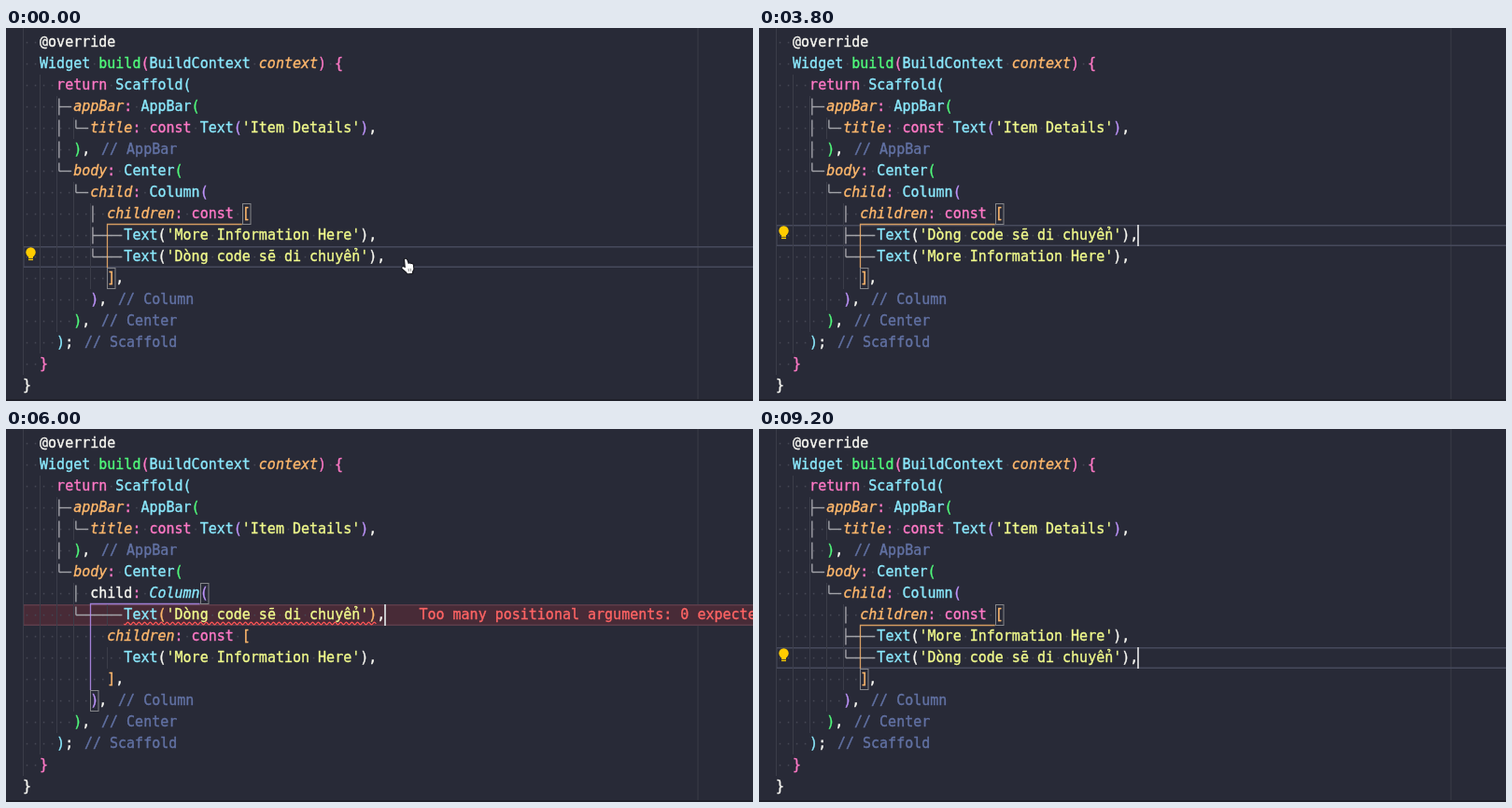
Recreate the animation shown at these times as an HTML page with a canvas. Size 800x400 px, loop 9400 ms.

```html
<!DOCTYPE html>
<html lang="en">
<head>
<meta charset="utf-8">
<title>Moving a line of code</title>
<style>
html, body { margin: 0; width: 100%; height: 100%; overflow: hidden; background: #282a37; }
canvas { display: block; width: 800px; height: 400px; }
</style>
</head>
<body>
<canvas id="stage" width="800" height="400"></canvas>
<script>
const ctx = document.getElementById('stage').getContext('2d');
const LOOP = 9400, LINE = 23, CHAR = 9.03;
const FONT = '15px "DejaVu Sans Mono", monospace';
const BACK = '#282a37', TREE = '#a2a3a9';
const WHITE = '#f8f8f2', PINK = '#ff79c6', CYAN = '#8be9fd', GREEN = '#50fa7b';
const PURPLE = '#bd93f9', ORANGE = '#ffb86c', YELLOW = '#f1fa8c', COMMENT = '#6272a4', RED = '#ff6464';
const BRACKETS = [WHITE, PINK, CYAN, GREEN, PURPLE, ORANGE];

const MORE = "            Text('More Information Here'),";
const MOVING = "            Text('Dòng code sẽ di chuyển'),";
const CODE = [
  '  @override',
  '  Widget build(BuildContext context) {',
  '    return Scaffold(',
  '      appBar: AppBar(',
  "        title: const Text('Item Details'),",
  '      ), // AppBar',
  '      body: Center(',
  '        child: Column(',
  '          children: const [',
  MORE,
  '          ],',
  '        ), // Column',
  '      ), // Center',
  '    ); // Scaffold',
  '  }',
  '}'
];

// Tree guides: [row, column, kind, end column]
const tee = (row, col, end) => [row, col, 'T', end];
const corner = (row, col, end) => [row, col, 'L', end];
const bar = (row, col) => [row, col, 'I'];
const OUTER = [tee(3, 4, 6), bar(4, 4), corner(4, 6, 8), bar(5, 4), corner(6, 4, 6)];
const LIST = [corner(7, 6, 8), bar(8, 8), tee(9, 8, 12), corner(10, 8, 12)];
const SWAPPED = [corner(7, 6, 8), bar(8, 8), tee(9, 0, 4), corner(9, 8, 12)];
const IN_COLUMN = [corner(7, 6, 8), tee(8, 8, 12), bar(9, 8), corner(10, 8, 12)];
const IN_CENTER = [tee(7, 6, 12), corner(8, 6, 8), bar(9, 8), corner(10, 8, 12)];
const LEAVING_CENTER = [bar(7, 6), corner(8, 6, 12)];

// Row of the moving line plus the editor decorations, from each time on
const STEPS = [
  { at: 0, row: 10, tree: LIST, bulb: 10 },
  { at: 1400, row: 9, tree: SWAPPED, bulb: 10, plainMore: true },
  { at: 1600, row: 9, tree: LIST, bulb: 9 },
  { at: 2200, row: 10, tree: LIST, bulb: 9, slanted: 'Text' },
  { at: 2500, row: 10, tree: LIST, bulb: 10 },
  { at: 3400, row: 9, tree: SWAPPED, bulb: 10, plainMore: true },
  { at: 3600, row: 9, tree: LIST, bulb: 9 },
  { at: 4800, row: 8, tree: [corner(7, 6, 8)] },
  { at: 5000, row: 8, tree: IN_COLUMN, error: true },
  { at: 5200, row: 7, tree: [], error: true, plain: ['child', 'children'], slanted: 'Column' },
  { at: 5500, row: 7, tree: IN_CENTER, error: true, plain: ['child'], slanted: 'Column' },
  { at: 5900, row: 8, tree: LEAVING_CENTER, error: true, plain: ['child'], slanted: 'Column' },
  { at: 6300, row: 8, tree: IN_COLUMN, error: true },
  { at: 6800, row: 9, tree: [corner(7, 6, 8), bar(8, 8)] },
  { at: 7000, row: 9, tree: LIST, bulb: 9 },
  { at: 7200, row: 10, tree: LIST, bulb: 9, slanted: 'Text' },
  { at: 7500, row: 10, tree: LIST, bulb: 10 }
];

// Enclosing bracket pair by row of the moving line
const PAIRS = {
  7: { open: [6, 18], close: [13, 6], color: GREEN },
  8: { open: [7, 21], close: [12, 8], color: PURPLE },
  9: { open: [8, 26], close: [11, 10], color: ORANGE }
};
PAIRS[10] = PAIRS[9];

const colX = col => 18 + col * CHAR;
const rowY = row => 4 + row * LINE;

function fill(color, x, y, w, h) {
  ctx.fillStyle = color;
  ctx.fillRect(x, y, w, h);
}

function polyline(points, color, width = 1) {
  ctx.strokeStyle = color;
  ctx.lineWidth = width;
  ctx.beginPath();
  points.forEach(([x, y]) => ctx.lineTo(x, y));
  ctx.stroke();
}

// A hairline outline gives the text its slightly heavier weight
function write(text, row, col, color, italic) {
  const x = colX(col), y = rowY(row) + 16;
  ctx.font = (italic ? 'italic ' : '') + FONT;
  ctx.fillStyle = ctx.strokeStyle = color;
  ctx.lineWidth = 0.35;
  ctx.fillText(text, x, y);
  ctx.strokeText(text, x, y);
}

function wordStyle(word, step) {
  if (/^(return|const)$/.test(word)) return [PINK, false];
  if (word === 'build') return [GREEN, false];
  if (/^(context|appBar|title|body|child|children)$/.test(word)) {
    return step.plain?.includes(word) ? [WHITE, false] : [ORANGE, true];
  }
  return /^[A-Z]/.test(word) ? [CYAN, false] : [WHITE, false];
}

function drawSpacing(line, row) {
  const indent = line.search(/\S/);
  for (let col = 0; col < indent; col += 2) {
    fill('#3b3d49', Math.round(colX(col)), row ? rowY(row) : 0, 1, row ? LINE : LINE + 4);
  }
  [...line.replace(/ \/\/.*/, '')].forEach((ch, col) => {
    if (ch === ' ') fill('#454754', colX(col + 0.5) - 0.8, rowY(row) + 10.8, 1.6, 1.6);
  });
}

function drawCode(lines, step) {
  const token = /\/\/.*|'[^']*'|@?\w+|\S/g;
  let depth = 1;
  lines.forEach((line, row) => {
    drawSpacing(line, row);
    for (const { 0: text, index } of line.matchAll(token)) {
      if (text.startsWith('//')) {
        write(text, row, index + 0.3, COMMENT);
        continue;
      }
      let color = WHITE, italic = false;
      if (text[0] === "'") color = YELLOW;
      else if (text === ':') color = PINK;
      else if ('([{'.includes(text)) color = BRACKETS[depth++ % 6];
      else if (')]}'.includes(text)) color = BRACKETS[--depth % 6];
      else if (/\w/.test(text)) [color, italic] = wordStyle(text, step);
      if (line === MORE && step.plainMore) color = WHITE;
      if (text === step.slanted && (text === 'Column' || line === MORE)) italic = true;
      write(text, row, index, color, italic);
    }
  });
}

function drawTree(guides) {
  for (const [row, col, kind, end] of guides) {
    const x = colX(col + 0.3), y = rowY(row) + 11.5;
    polyline([[x, y - 9], [x, kind === 'L' ? y : y + 9]], TREE, 1.4);
    if (end) polyline([[x, y], [colX(end) - 2, y]], TREE, 1.4);
  }
}

function drawPair({ open, close, color }) {
  const left = Math.round(colX(close[1])) + 0.5, top = rowY(open[0] + 1) - 0.5;
  ctx.globalAlpha = 0.8;
  polyline([[colX(open[1]), top], [left, top], [left, rowY(close[0])]], color, 1.3);
  ctx.globalAlpha = 1;
  ctx.strokeStyle = '#85868a';
  ctx.lineWidth = 1;
  for (const [row, col] of [open, close]) {
    ctx.strokeRect(Math.round(colX(col)) + 0.5, rowY(row) + 0.5, 8.5, LINE - 1);
  }
}

function drawCurrentLine({ row, error }) {
  const y = rowY(row);
  if (error) fill('#482b37', 18, y, 782, LINE);
  ctx.strokeStyle = error ? '#5d3d4a' : '#474a5c';
  ctx.lineWidth = 1.5;
  ctx.strokeRect(18.75, y + 0.75, 800, LINE - 1.5);
}

function drawError(row) {
  write('Too many positional arguments: 0 expected, but 1 found.', row, 47, RED);
  const points = [];
  for (let x = colX(12); x <= colX(42); x += 1) {
    points.push([x, rowY(row) + 20.5 + 1.4 * Math.sin(x * Math.PI / 3)]);
  }
  polyline(points, '#ff5555', 1.2);
}

function drawBulb(row) {
  const y = rowY(row) + 6.5;
  ctx.fillStyle = '#ffcc00';
  ctx.beginPath();
  ctx.arc(26.5, y, 5.2, 0, 7);
  ctx.fill();
  fill('#ffcc00', 24, y + 3, 5, 3.4);
  fill('#ffcc00', 24, y + 7.2, 5, 1.4);
}

function drawHand() {
  const hand = new Path2D('M427 248 q1.5-1 2.4 1 l1.4 4 q2-1.3 2.8.2 q2-.6 2.3 1.1 l.4 4.2 -1.4 3 .2 1.4 -5.2.4 -.7-1.3 -4.8-4.2 q-.7-1.8 1.2-1.5 l2.3 1 z');
  ctx.strokeStyle = '#15161c';
  ctx.lineWidth = 2;
  ctx.stroke(hand);
  ctx.fillStyle = '#fff';
  ctx.fill(hand);
  polyline([[431, 258], [431.4, 261]], '#555', 0.7);
  polyline([[433.2, 257.8], [433.6, 260.8]], '#555', 0.7);
}

function caretVisible(time) {
  if (time < 100) return false;
  let since = 100;
  STEPS.forEach((step, i) => {
    if (i && step.at <= time && step.row !== STEPS[i - 1].row) since = step.at;
  });
  return (time - since) % 1000 < 500;
}

function draw(time) {
  const step = STEPS.filter(s => s.at <= time).pop();
  const lines = CODE.slice();
  lines.splice(step.row, 0, MOVING);

  fill(BACK, 0, 0, 800, 400);
  fill('#3a3c48', 740.5, 0, 1, 398);
  drawCurrentLine(step);
  drawCode(lines, step);
  drawTree(OUTER);
  drawTree(step.tree);
  drawPair(PAIRS[step.row]);
  if (step.error) drawError(step.row);
  if (step.bulb) drawBulb(step.bulb);
  if (caretVisible(time)) fill('#c4c5c9', 405, rowY(step.row), 2, LINE);
  if (time < 200) drawHand();
  fill('#1f2029', 0, 398, 800, 2);
}

const start = performance.now();
function tick() {
  draw((performance.now() - start) % LOOP);
  requestAnimationFrame(tick);
}
tick();
</script>
</body>
</html>
```
